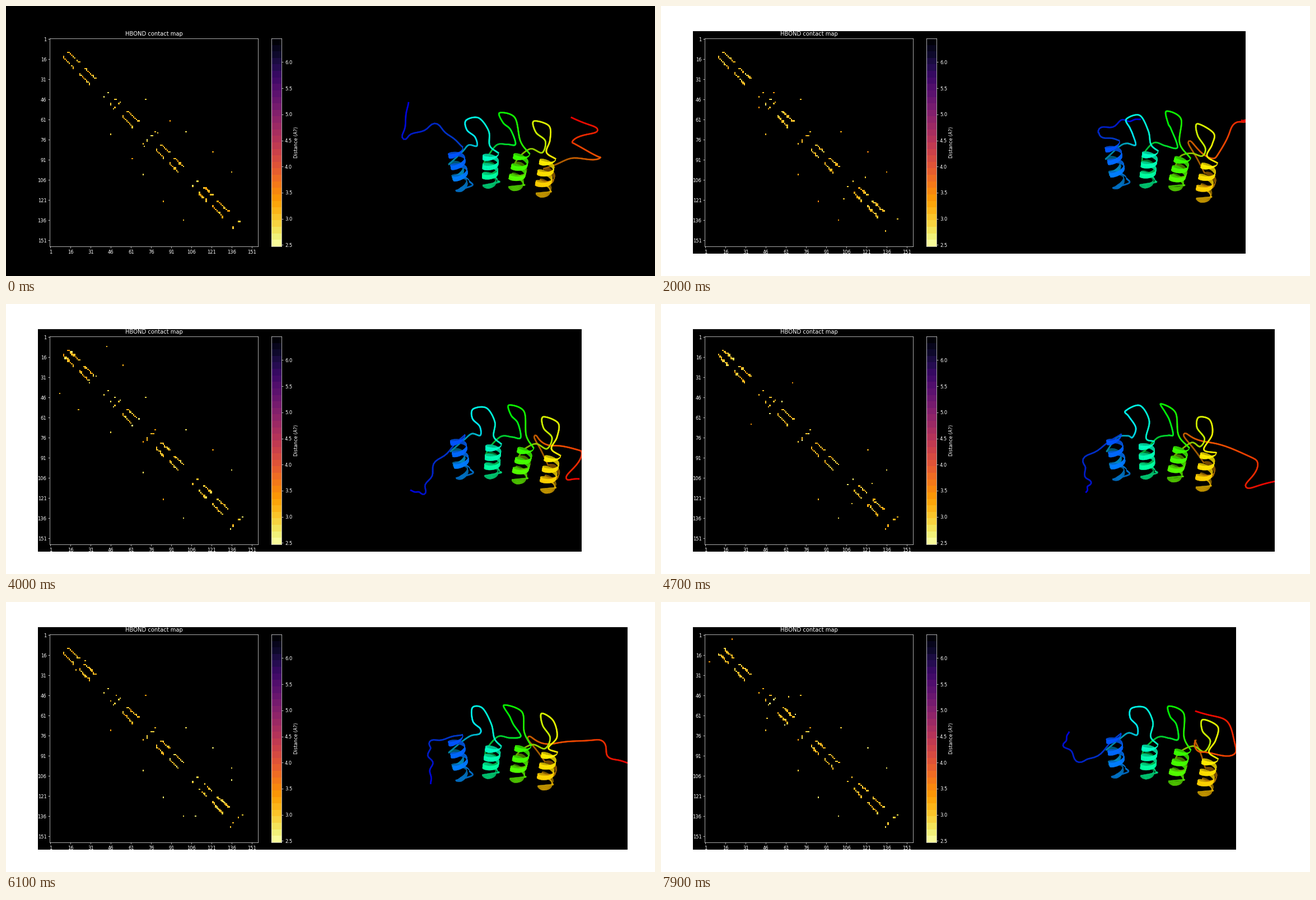
A matplotlib script that plays this animation: 1159x483 px, repeating every 8000 ms.

```python
import numpy as np
import matplotlib.pyplot as plt
from matplotlib.animation import FuncAnimation
from matplotlib.collections import PolyCollection
from matplotlib.colors import hsv_to_rgb
from matplotlib.patches import Rectangle

W, H, DPI = 1159, 483, 72
PT = 60 / DPI  # text and lines are sized in points of a 60 dpi page
FRAMES, STEP = 80, 100
SIZE = 155
VMIN, VMAX = 2.473, 6.455


def points(*flat):
    return np.array(flat, float).reshape(-1, 2)


# Key poses: frame number, then lift and tilt of the whole body.
POSE_AT = [0, 11, 29, 40, 53, 69, 79]
SWAY = points(6, -0.10, 12, -0.13, 0, 0.14, -5, 0, -7, -0.03, 3, -0.03, 0, 0.05)

# Waypoints of the two loose ends in each key pose.
HEAD = np.array([points(719, 172, 712, 236, 765, 213),
                 points(865, 128, 826, 155, 800, 200),
                 points(801, 325, 786, 275, 768, 258),
                 points(722, 333, 747, 336, 766, 288),
                 points(751, 362, 781, 318, 763, 286),
                 points(777, 306, 768, 262, 738, 227),
                 points(729, 232, 722, 258, 760, 285)])
END = np.array([points(1010, 274, 1063, 270, 1010, 245, 1055, 222, 1009, 199),
                points(945, 238, 986, 261, 992, 180, 1052, 199, 1070, 228),
                points(935, 240, 965, 272, 1008, 235, 940, 200, 916, 168),
                points(945, 237, 975, 255, 1028, 262, 1002, 310, 1024, 313),
                points(934, 232, 950, 256, 1032, 265, 1040, 317, 1065, 361),
                points(930, 245, 970, 272, 1045, 234, 1079, 198, 1071, 167),
                points(955, 247, 965, 270, 1025, 268, 1010, 215, 954, 195)])

# Body at rest: the loops, and top and bottom of the four helix pairs.
LOOPS = [points(818, 248, 832, 237, 847, 240, 846, 224, 833, 210, 834, 193, 858, 191, 873, 216, 871, 242),
         points(863, 262, 884, 242, 904, 243, 919, 244, 914, 218, 902, 204, 898, 186, 925, 197, 929, 240),
         points(924, 266, 946, 255, 966, 264, 975, 244, 960, 227, 959, 207, 986, 218, 984, 243, 974, 264)]
COLUMNS = points(806, 241, 817, 314, 871, 255, 867, 313, 929, 260, 914, 323, 977, 274, 964, 340)

# Hue at each joint: tail, then (front helix, back helix, loop) four times.
HUES = [240, 222, 207, 192, 168, 155, 142, 108, 98, 82, 57, 47, 36, 0]

HELIX_ROWS = [(11, 18), (23, 30), (55, 62), (80, 85), (90, 96), (112, 117), (122, 129)]
LASTING = [(41, 44), (46, 49), (46, 50), (48, 53), (49, 52), (46, 72), (70, 79), (70, 102),
           (73, 76), (73, 77), (73, 78), (85, 122), (100, 136), (107, 110), (107, 111),
           (137, 141), (137, 142), (135, 144)]


def phase(frame):
    """Index of the running pose and progress towards the next one."""
    k = min(int(np.searchsorted(POSE_AT, frame, side="right")) - 1, len(POSE_AT) - 2)
    return k, (frame - POSE_AT[k]) / (POSE_AT[k + 1] - POSE_AT[k])


def blend(poses, frame):
    k, u = phase(frame)
    ease = u * u * (3 - 2 * u)
    return poses[k] * (1 - ease) + poses[k + 1] * ease


def shake(pts, frame, amp, seed, reach=0):
    """Thermal jitter that fades out at the key poses."""
    rng = np.random.default_rng(seed)
    offset = rng.uniform(0, 2 * np.pi, pts.shape)
    speed = rng.uniform(0.6, 1.3, pts.shape)
    amp = np.broadcast_to(amp, len(pts))[:, None]
    move = amp * np.sin(speed * frame + offset)
    move[:, 0] += reach * np.linspace(0, 1, len(pts))
    return pts + np.sin(np.pi * phase(frame)[1]) * move


def warp(pts, lift, tilt):
    """Lift, tilt and shear the resting body."""
    x, y = pts.T
    return np.column_stack([x + tilt * (0.5 * (x - 800) + 1.5 * np.maximum(265 - y, 0)),
                            y + lift + tilt * (x - 890)])


def spline(pts, per=12):
    p = np.vstack([2 * pts[0] - pts[1], pts, 2 * pts[-1] - pts[-2]])
    a, b, c, d = (p[i:len(p) - 3 + i, None] for i in range(4))
    t = np.linspace(0, 1, per, endpoint=False)[None, :, None]
    s = 0.5 * (2 * b + (c - a) * t + (2 * a - 5 * b + 4 * c - d) * t**2
               + (3 * b - a - 3 * c + d) * t**3)
    return np.vstack([s.reshape(-1, 2), pts[-1]])


def normals(p):
    d = np.gradient(p, axis=0)
    d /= np.maximum(np.hypot(d[:, 0], d[:, 1]), 1e-6)[:, None]
    return np.column_stack([-d[:, 1], d[:, 0]])


def tube(pts, z0, z1, bend=0):
    p = spline(np.asarray(pts, float))
    t = np.linspace(0, 1, len(p))
    p = p + normals(p) * (bend * np.sin(8 * np.pi * t) * np.sin(np.pi * t))[:, None]
    return p, 1.2 * normals(p), z0 + (z1 - z0) * np.minimum(1, 2.5 * t)


def helix(a, b, turns, z0, radius):
    """Right-handed ribbon seen slightly from above."""
    t = np.linspace(0, 1, int(32 * turns))
    th = 2 * np.pi * turns * t
    axis = (b - a) / np.hypot(*(b - a))
    side = np.array([axis[1], -axis[0]])
    down = axis * np.sign(axis[1])
    p = (a + np.outer(t, b - a) + np.outer(radius * np.cos(th), side)
         + np.outer(6 * np.sin(th), down))
    width = 3.9 * np.clip(np.minimum(t, 1 - t) * 9, 0.3, 1)
    return p, np.outer(width, axis), z0 + 13 * np.sin(th)


def body(frame):
    """Chain pieces as (centre line, half width, depth, first hue, last hue)."""
    sway = blend(SWAY, frame)
    coils = [shake(blend(HEAD, frame), frame, [24, 16, 8], 1)]
    coils += [shake(warp(loop, *sway), frame, 4, 2 + n) for n, loop in enumerate(LOOPS)]
    coils.append(shake(blend(END, frame), frame, np.linspace(4, 24, 5), 5, reach=38))
    columns = shake(warp(COLUMNS, *sway), frame, 3, 6).reshape(4, 2, 2)

    last = []
    for n, (top, bottom) in enumerate(columns):
        hue = HUES[3 * n:3 * n + 4]
        drop = bottom - top
        shift = np.array([4 * n - 5, 0])
        front = helix(top, top + 0.85 * drop, 3, 10, 14)
        back = helix(bottom + 0.3 * shift, top + 0.35 * drop + shift, 2, -16, 12)
        coil = last + [*coils[n], front[0][0]]
        link = [front[0][-1], bottom + [16, -6], back[0][0]]
        yield *tube(coil, -14 if n else 8, 15 if n else 0, 0 if n else 4), hue[0], hue[1]
        yield *front, hue[1], hue[2]
        yield *tube(link, 8, -4), hue[2], hue[2]
        yield *back, hue[2], hue[3]
        last = [back[0][-1]]
    yield *tube(last + [*coils[-1]], -18, 12, 3), *HUES[-2:]


def build(frame):
    """Return quads and colours from back to front, and the right extent."""
    quads, colors, depth = [], [], []
    extent = 0
    for p, h, z, hue0, hue1 in body(frame):
        lo, hi = p - h, p + h
        quads.append(np.stack([hi[:-1], hi[1:], lo[1:], lo[:-1]], axis=1))
        zm = (z[:-1] + z[1:]) / 2
        hue = np.linspace(hue0, hue1, len(zm)) / 360
        value = np.clip(0.8 + zm * 0.012, 0.45, 1)
        colors.append(hsv_to_rgb(np.column_stack([hue, np.ones_like(hue), value])))
        depth.append(zm)
        extent = max(extent, p[:, 0].max())
    order = np.argsort(np.concatenate(depth), kind="stable")
    return np.concatenate(quads)[order], np.concatenate(colors)[order], extent


def contacts(frame):
    """Symmetric distance matrix, NaN where there is no bond."""
    rng = np.random.default_rng(100 + frame)
    grid = np.full((SIZE, SIZE), np.nan)

    def put(i, j, chance, mean=3.05, spread=0.14):
        if rng.random() < chance:
            grid[i - 1, j - 1] = grid[j - 1, i - 1] = rng.normal(mean, spread)

    for first, last in HELIX_ROWS:
        for i in range(first, last + 1):
            put(i, i + 4, 0.96)
            put(i, i + 3, 0.8 if i == first else 0.2)
            put(i, i + 5, 0.8 if i == last else 0.2)
    for i, j in LASTING:
        put(i, j, 0.88, 2.95, 0.2)
    for i in rng.integers(1, 120, 3):
        put(i, i + rng.integers(3, 36), 0.8, 2.9, 0.25)
    return grid


plt.rcParams.update({
    "font.family": "DejaVu Sans", "font.size": 10 * PT, "text.color": "white",
    "axes.edgecolor": "white", "axes.facecolor": "black", "axes.linewidth": 0.8 * PT,
    "axes.titlesize": 12 * PT, "axes.titlepad": 6 * PT,
    "xtick.color": "white", "ytick.color": "white"})
fig = plt.figure(figsize=(W / DPI, H / DPI), dpi=DPI, facecolor="black")


def panel(x, y, w, h):
    ax = fig.add_axes([x / W, 1 - (y + h) / H, w / W, h / H])
    ax.tick_params(length=3.5 * PT, width=0.8 * PT, pad=3.5 * PT)
    return ax


top, side = 0.12 * H, 0.77 * H
heat = panel(78.2, top, side, side)
image = heat.imshow(contacts(0), cmap="inferno_r", vmin=VMIN, vmax=VMAX, aspect="auto",
                    interpolation="nearest", extent=(0.5, SIZE + 0.5, SIZE + 0.5, 0.5))
heat.set_xticks(range(1, SIZE, 15))
heat.set_yticks(range(1, SIZE, 15))
heat.set_title("HBOND contact map")

bar = panel(473.5, top, side / 20, side)
edges = np.linspace(VMIN, VMAX, 33)
centres = (edges[:-1] + edges[1:]) / 2
bar.pcolormesh([0, 1], edges, centres[:, None], cmap="inferno_r", vmin=VMIN, vmax=VMAX)
bar.set_ylim(VMIN, VMAX)
bar.set_xticks([])
bar.yaxis.tick_right()
bar.set_yticks(np.arange(2.5, 6.1, 0.5))
bar.yaxis.set_major_formatter("{x:.1f}")

stage = panel(0, 0, W, H)
stage.set(xlim=(0, W), ylim=(H, 0))
stage.axis("off")
stage.text(518.5, 244, "Distance (A?)", rotation=90, ha="center", va="center")
ribbon = PolyCollection([], linewidths=0.4)
stage.add_collection(ribbon, autolim=False)
borders = [stage.add_patch(Rectangle(xy, w, h, fc="white", lw=0, zorder=9))
           for xy, w, h in (((0, 0), W, 45), ((0, 443), W, H - 443),
                            ((0, 0), 57, H), ((W, 0), W, H))]


def draw(frame):
    quads, colors, extent = build(frame)
    ribbon.set_verts(quads)
    ribbon.set_facecolor(colors)
    ribbon.set_edgecolor(colors)
    image.set_data(np.ma.masked_invalid(contacts(frame)))
    borders[-1].set_x(round(extent))
    for patch in borders:
        patch.set_visible(frame > 0)
    return [ribbon, image, *borders]


anim = FuncAnimation(fig, draw, frames=FRAMES, interval=STEP, repeat=True,
                     repeat_delay=0, blit=False)
plt.show()
```
